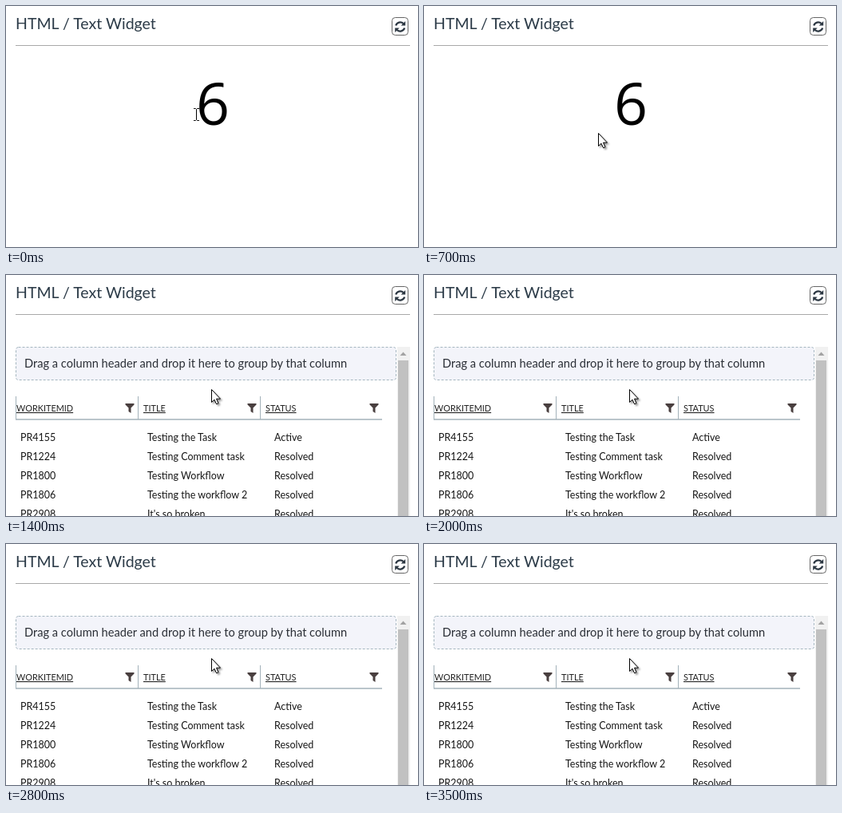
An HTML page that plays this animation: 516 by 302 pixels, repeating every 3.6 s.

```html
<!DOCTYPE html>
<html lang="en">
<head>
<meta charset="utf-8">
<title>Text widget</title>
<style>
  html, body { margin: 0; width: 100%; height: 100%; overflow: hidden; background: #fff; }
  svg { display: block; font-family: Lato, "Open Sans", sans-serif; }
  .title { font-size: 19.5px; fill: #2c3b48; }
  .count { font: 73.5px "Open Sans", "Noto Sans", sans-serif; text-anchor: middle; }
  .hint { font-size: 14.65px; fill: #2b2f36; }
  .head { font-size: 10.9px; fill: #222; text-decoration: underline; }
  .cell { font-size: 12.5px; fill: #161616; }
  .cursor { stroke: #000; stroke-width: 1; fill: #fff; stroke-linejoin: round; }
  .shadow { filter: drop-shadow(2px 2px 1.2px #0006); }
</style>
</head>
<body>
<svg width="516" height="302" viewBox="0 0 516 302">
  <defs>
    <g id="turn">
      <path d="M-5.4 -1.5A5.6 5.6 0 0 1 4 -4" fill="none" stroke="#2c3742" stroke-width="2.3"/>
      <path d="M6.5 -7V-1.5H1Z" fill="#2c3742"/>
    </g>
  </defs>

  <text class="title" x="12" y="29">HTML / Text Widget</text>
  <path d="M12 49.5H506" stroke="#a9a9a9"/>
  <rect x="483.5" y="14.5" width="20" height="22" rx="4" fill="#fff" stroke="#666"/>
  <use href="#turn" transform="translate(493.7 26)"/>
  <use href="#turn" transform="translate(493.7 26) rotate(180)"/>

  <text id="count" class="count" x="259" y="149">6</text>

  <g id="grid">
    <rect x="12.5" y="90.5" width="476" height="41" rx="3" fill="#f3f4fa" stroke="#a5b6c0" stroke-dasharray="3 2"/>
    <text class="hint" x="23" y="116">Drag a column header and drop it here to group by that column</text>
    <path d="M12 181H471" stroke="#a3b2ba" stroke-width="1.6"/>
    <rect x="490" y="90" width="16" height="212" fill="#f1f1f1"/>
    <path d="M493.5 101L497.5 96.5L501.5 101Z" fill="#a3a3a3"/>
    <rect x="491" y="107" width="13" height="195" fill="#c1c1c1"/>
  </g>

  <g id="beam" class="cursor">
    <path d="M-3 -7.5H-.5L.5 -6.5L1.5 -7.5H4M.5 -6.5V6.5M-3 7.5H-.5L.5 6.5L1.5 7.5H4" fill="none"/>
  </g>
  <g id="arrow" class="cursor shadow">
    <path d="M.5 .5V16.5L4 13.2L6.6 18.8L9 17.7L6.5 12.2H11.5Z"/>
  </g>
  <g id="hand" class="cursor shadow">
    <path d="M-.5 14V2Q-.5 .5 1 .5T2.5 2V8.5Q2.5 7 4 7T5.6 9Q5.6 7.8 7.2 8T8.6 10Q9 9 10.3 9.4T11.5 11V16Q11.5 19 9.5 21V23.5H1.5V21.5Q-1.5 18.5 -5.5 13Q-6 11.3 -4.5 11T-.5 14Z"/>
    <path d="M2.5 8.5V13M5.6 9V13M8.6 10V13" fill="none"/>
  </g>
</svg>
<script>
const el = id => document.getElementById(id);
const LOOP = 3600, STEP = 100, OPEN_STEP = 14;
const cursors = ["beam", "arrow", "hand"];

const rows = [
  ["PR4155", "Testing the Task", "Active"],
  ["PR1224", "Testing Comment task", "Resolved"],
  ["PR1800", "Testing Workflow", "Resolved"],
  ["PR1806", "Testing the workflow 2", "Resolved"],
  ["PR2908", "It's so broken", "Resolved"]
];
const text = (kind, x, y, label) => `<text class="${kind}" x="${x}" y="${y}">${label}</text>`;

let markup = "";
["WORKITEMID", "TITLE", "STATUS"].forEach((label, i) => {
  const x = 12.5 + 153 * i;
  markup += `<path d="M${x} 152V181" stroke="#a3b2ba"/>`
    + `<path d="M${x + 137} 161h11v1.5l-4 4v6.5l-3 -2v-4.5l-4 -4z" fill="#493f3f"/>`
    + text("head", i ? x + 6.5 : 13, 171, label);
});
rows.forEach((row, r) => row.forEach((label, c) => {
  markup += text("cell", 18 + 159 * c, 208 + 24 * r, label);
}));
el("grid").insertAdjacentHTML("beforeend", markup);

const mix = (a, b, u) => a + (b - a) * u;
const smooth = u => u * u * (3 - 2 * u);
const easeOut = u => 1 - (1 - u) ** 2;

// The pointer drifts off the number, then returns and clicks it.
function pointer(step) {
  if (step <= 5) {
    const u = smooth(step / 5);
    return [mix(238, 180, u), mix(136, 174, u)];
  }
  const u = easeOut(Math.min(1, (step - 5) / 7));
  return [mix(180, 257, u), mix(174, 143, u)];
}

function draw(now) {
  const step = Math.floor(now % LOOP / STEP);
  const open = step >= OPEN_STEP;
  const [x, y] = pointer(step).map(Math.round);
  const shape = open ? "arrow" : step < 1 ? "beam" : step > 5 && x > 240 ? "hand" : "arrow";
  el("count").style.display = open ? "none" : "";
  el("grid").style.display = open ? "" : "none";
  for (const id of cursors) el(id).style.display = id === shape ? "" : "none";
  el(shape).setAttribute("transform", `translate(${x} ${y})`);
}

const start = performance.now();
function tick() {
  draw(performance.now() - start);
  requestAnimationFrame(tick);
}
tick();
</script>
</body>
</html>
```
